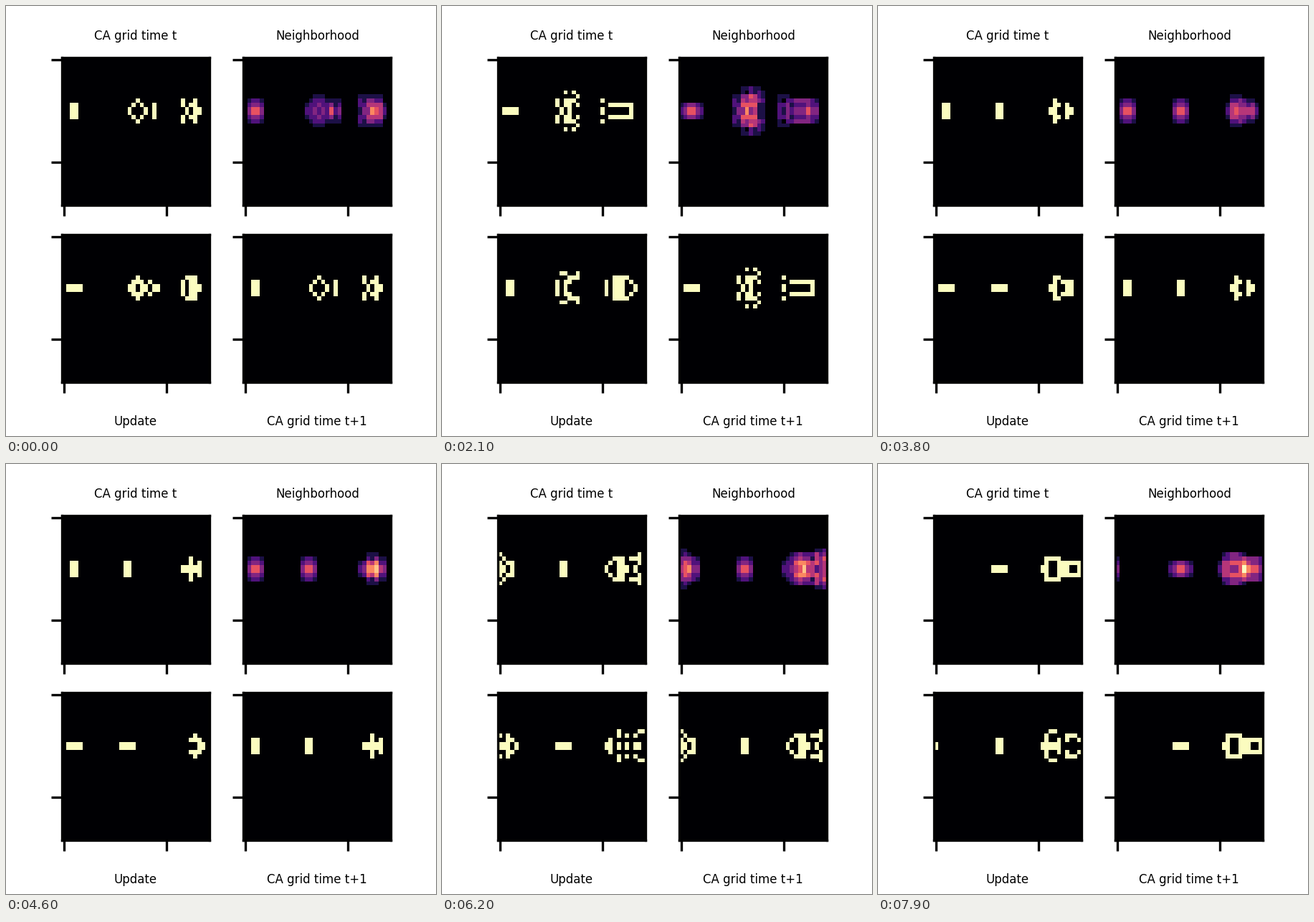
These frames come from a looping animation (600x600 px, 8 s). A matplotlib script:

```python
import numpy as np
import matplotlib.pyplot as plt
from matplotlib.animation import FuncAnimation

SIZE, STEPS = 36, 80
BIRTH, SURVIVE = (3, 6, 8), (2, 4, 5)

# Live columns in the upper half; the pattern mirrors to row 25 - r
SEED = {
    10: [18, 29, 32],
    11: [2, 3, 17, 19, 22, 29, 31, 32],
    12: [2, 3, 16, 20, 22, 30, 32, 33],
}


def start():
    grid = np.zeros((SIZE, SIZE), int)
    for row, cols in SEED.items():
        grid[row, cols] = grid[25 - row, cols] = 1
    return grid


def neighbors(grid):
    """Count the eight neighbors of every cell on a torus."""
    return sum(np.roll(grid, (dy, dx), (0, 1))
               for dy in (-1, 0, 1) for dx in (-1, 0, 1) if dy or dx)


def step(grid, count):
    return np.where(grid == 1, np.isin(count, SURVIVE),
                    np.isin(count, BIRTH)).astype(int)


def run():
    grid, history = start(), []
    for _ in range(STEPS):
        count = neighbors(grid)
        new = step(grid, count)
        history.append((grid, count, new, grid))
        grid = new
    return history


history = run()

plt.rcParams["font.family"] = "DejaVu Sans"
fig, axes = plt.subplots(2, 2, figsize=(2, 2), dpi=300)
fig.subplots_adjust(left=0.125, right=0.9, bottom=0.125, top=0.88,
                    wspace=0.2, hspace=0.2)

images = []
for ax, data, top in zip(axes.flat, history[0], (1, 8, 1, 1)):
    images.append(ax.imshow(data, cmap="magma", vmin=0, vmax=top))
    ax.set_xticks([0, 25])
    ax.set_yticks([0, 25])
    ax.set_xticklabels([])
    ax.set_yticklabels([])

axes[0, 0].set_title("CA grid time t", fontsize=4)
axes[0, 1].set_title("Neighborhood", fontsize=4)
axes[1, 0].set_xlabel("Update", fontsize=4)
axes[1, 1].set_xlabel("CA grid time t+1", fontsize=4)


def update(i):
    for image, data in zip(images, history[i]):
        image.set_data(data)
    return images


anim = FuncAnimation(fig, update, frames=STEPS, interval=100,
                     repeat=True, repeat_delay=0)
plt.show()
```
